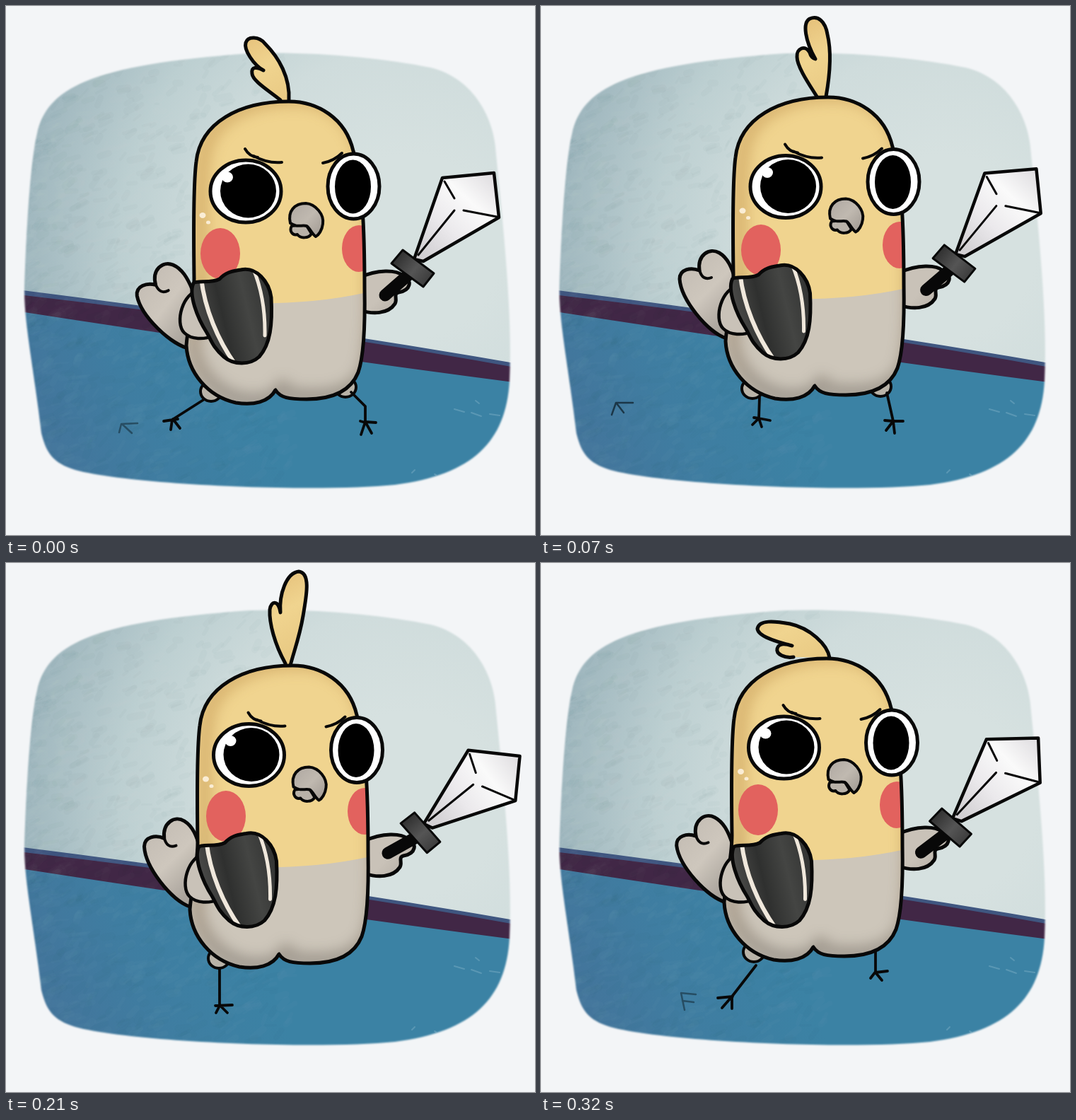
Write an HTML page with a canvas that moves like this. It is 748 px wide and 748 px high and loops after 0.35 s.

```html
<!DOCTYPE html>
<html lang="en">
<head>
<meta charset="utf-8">
<title>Bird knight</title>
<style>
html, body { margin: 0; width: 100%; height: 100%; overflow: hidden; background: #f3f5f7 }
canvas { display: block }
</style>
</head>
<body>
<canvas id="stage" width="748" height="748"></canvas>
<script>
const SIZE = 748, STEP = 70, INK = '#080808', GREY = '#c9c2b8', YELLOW = '#f0d48f';
const stage = document.getElementById('stage').getContext('2d');
let ctx = stage;

// Offsets are [dx, dy, degrees]; crest, legs and print are redrawn in each pose.
const poses = [
  { body: [0, 0], face: [0, 0], cheek: [0, 0], shield: [0, 0], wing: [-1, 15, -7], hand: [0, 0], sword: [0, 0, 0],
    crest: 'M388 133C372 120 349 106 348 96C346 85 355 86 364 91C350 83 336 62 339 52C342 42 358 43 366 53C386 73 402 101 400 134',
    thighs: [[290, 545], [480, 539]],
    legs: 'M279 557L235 585M223 587L243 584M235 585L233 599M236 584L246 597M488 546L508 566V588L523 589M508 588L502 606M508 588L517 604M501 587L508 589',
    print: 'M186 590L163 591L160 603M165 592L178 604', fade: .55 },
  { body: [6, -6], face: [7, -6.5], cheek: [8, -5], shield: [5.5, -6], wing: [0, 0, 0], hand: [7, -7], sword: [9, -7, .6],
    crest: 'M390 128C380 112 362 86 362 72C361 60 374 54 380 66Q382 73 388 75C374 50 369 24 380 18C392 13 402 22 405 40C411 65 408 100 403 128',
    thighs: [[299, 541], [480, 538]],
    legs: 'M309 553L308 583L299 592M308 583L312 595M301 582L308 583L324 586M489 547L498 587L488 600M486 586L498 587L512 587M498 587L500 604',
    print: 'M130 561L106 561L100 578M107 562L117 575', fade: .8 },
  { body: [14, -8], face: [15, -8], cheek: [15, -9], shield: [14.5, -13.5], wing: [12, -7, 1], hand: [15, -8], sword: [14, -6, 3.6],
    crest: 'M394 125C386 105 371 74 373 60C375 48 387 50 390 68C387 45 390 12 406 12C424 12 420 50 416 70C413 95 408 110 402 125',
    thighs: [[477, 546]],
    legs: 'M477 557L457 582M441 583L470 581M457 582L452 587L457 595M328 547Q342 545 342 527M338 534L366 536V570M382 567L367 572L359 583M358 569L367 572L375 583',
    print: 'M68 533L50 538V555M50 538L62 551', fade: .75 },
  { body: [5, 10], face: [4.5, 9.5], cheek: [8, 8], shield: [7.5, 9.5], wing: [-2, 16, 1], hand: [7, 9], sword: [11, 10, 12],
    crest: 'M395 142C380 115 372 85 373 66C375 52 386 53 388 70C386 45 396 14 414 12C432 14 424 50 420 75C415 105 407 125 402 145',
    thighs: [[301, 559]],
    legs: 'M302 573V626M296 626L320 625M302 626L297 636M303 626L313 636' },
  { body: [4, 0], face: [4.5, -1], cheek: [4, -1], shield: [7.5, 9.5], wing: [0, 10, -3], hand: [6, -1], sword: [4, 3, 4],
    crest: 'M357 133C345 135 332 129 334 121C336 113 346 114 355 117C335 112 307 104 306 93C308 80 330 82 352 86C380 92 405 115 408 134',
    thighs: [[301, 550]],
    legs: 'M304 569L270 613M250 615L271 613M270 613L256 629M270 613V630M473 548V578L466 587M473 579L490 577M473 579L482 590',
    print: 'M219 610L198 608L203 632M200 619L216 621', fade: .55 }
];

const frame = new Path2D('M44 180C58 118 115 83 345 67C440 64 535 74 600 87C662 102 691 160 693 210C702 300 717 440 712 530C707 616 660 663 550 677C440 688 180 678 98 656C66 646 57 632 50 604C41 525 26 450 26 405C28 330 34 220 44 180Z');
const torso = new Path2D('M400 135C440 135 480 158 491 205C504 250 507 310 507 400C508 455 506 495 498 518C486 548 455 556 425 556C400 556 388 554 381 543C372 560 350 565 325 561C285 552 257 518 255 480C257 450 266 420 266 385C265 310 265 250 269 220C275 165 330 135 400 135Z');

function fill(path, color) {
  ctx.fillStyle = color;
  ctx.fill(new Path2D(path));
}

function line(path, color = INK, width = 4) {
  ctx.strokeStyle = color;
  ctx.lineWidth = width;
  ctx.stroke(new Path2D(path));
}

function shape(path, color, width = 5) {
  fill(path, color);
  line(path, INK, width);
}

function oval(x, y, rx, ry, color, width = 0) {
  ctx.beginPath();
  ctx.ellipse(x, y, rx, ry, 0, 0, 7);
  ctx.fillStyle = color;
  ctx.fill();
  if (!width) return;
  ctx.strokeStyle = INK;
  ctx.lineWidth = width;
  ctx.stroke();
}

function ramp(x0, y0, x1, y1, ...colors) {
  const g = ctx.createLinearGradient(x0, y0, x1, y1);
  colors.forEach((c, i) => g.addColorStop(i / (colors.length - 1), c));
  return g;
}

function at([dx, dy, turn = 0], px, py, draw) {
  ctx.save();
  ctx.translate(dx + px, dy + py);
  ctx.rotate(turn * Math.PI / 180);
  ctx.translate(-px, -py);
  draw();
  ctx.restore();
}

function paintRoom() {
  const canvas = document.createElement('canvas');
  canvas.width = canvas.height = SIZE;
  ctx = canvas.getContext('2d');
  const wall = ctx.createRadialGradient(570, 340, 130, 570, 340, 560);
  wall.addColorStop(0, '#d6e1e0');
  wall.addColorStop(.35, '#cfdcdc');
  wall.addColorStop(.65, '#bccfd1');
  wall.addColorStop(1, '#9cb4bc');
  ctx.fillStyle = wall;
  ctx.fillRect(0, 0, SIZE, SIZE);
  fill('M0 399Q400 449 748 510V748H0Z', '#3f5680');
  fill('M0 406Q400 452 748 516V748H0Z', '#412746');
  fill('M0 429Q400 491 748 536V748H0Z', ramp(40, 640, 330, 510, '#44739a', '#3f7da1', '#3b82a4'));

  // Faint brush grain, strongest on the left
  let seed = 7;
  const random = () => (seed = seed * 16807 % 2147483647) / 2147483647;
  ctx.lineCap = 'round';
  for (let i = 0; i < 1600; i++) {
    const x = 20 + 380 * random() ** 1.5, y = 60 + 620 * random();
    const tone = random() < .5 ? '255,255,255' : '30,60,80';
    line(`M${x} ${y}l${4 + 14 * random()} ${-12 * random()}`, `rgba(${tone},.016)`, 3 + 8 * random());
  }
  line('M634 570l14 4M658 575l14 5M684 577l14 2M664 558l5 4M574 660l4 -4M606 662l2 1', 'rgba(170,205,220,.28)', 2);

  ctx.globalCompositeOperation = 'destination-in';
  ctx.filter = 'blur(1.3px)';
  ctx.fill(frame);
  ctx = stage;
  return canvas;
}

function drawWing() {
  const wing = 'M262 470C235 461 198 415 196 386C196 372 212 369 224 374C221 352 238 341 252 349C264 356 270 370 275 388';
  shape(wing, ramp(200, 370, 270, 440, '#c4bdb4', '#cec7bd', '#aaa49c'));
  line('M224 373Q228 389 241 384');
}

function drawHand() {
  shape('M500 384C525 372 552 373 561 381C576 388 572 402 555 405C547 407 554 415 550 421C540 436 518 436 500 430', ramp(510, 375, 565, 430, GREY, GREY, '#b5aea5'));
}

function drawSword() {
  line('M568 381L536 409', INK, 17);
  shape('M577 358L617 243L690 236L697 299L590 361Z', ramp(590, 350, 690, 240, '#d2d0d3', '#ebe9ec', '#fafafa', '#dfdde0'), 4.5);
  line('M620 248L634 272M583 352L634 289M647 289L694 298', INK, 3);
  shape('M561 345L605 378L590 397L545 364Z', ramp(555, 355, 600, 390, '#333', '#555', '#3a3a3a'), 3);
}

function drawBody(pose) {
  ctx.save();
  ctx.clip(torso);
  ctx.fillStyle = YELLOW;
  ctx.fillRect(240, 120, 280, 460);
  fill('M240 414Q400 431 515 404V580H240Z', '#cdc6ba');
  ctx.save();
  ctx.filter = 'blur(9px)';
  ctx.translate(10, -4);
  ctx.lineWidth = 22;
  ctx.strokeStyle = ramp(0, 140, 0, 560, 'rgba(160,105,40,.28)', 'rgba(160,105,40,.28)', 'rgba(90,85,80,.38)');
  ctx.stroke(torso);
  ctx.restore();
  const [bx, by] = pose.body, [cx, cy] = pose.cheek;
  ctx.translate(cx - bx, cy - by);
  oval(303, 350, 28, 36, '#e2625e');
  oval(499, 343, 24, 33, '#e2625e');
  ctx.restore();
  ctx.strokeStyle = INK;
  ctx.lineWidth = 5;
  ctx.stroke(torso);
}

function drawFace() {
  oval(278, 296, 4.5, 4, '#faedd5');
  oval(286, 306, 3, 2.5, '#faedd5');
  line('M338 202Q344 213 356 214M350 212Q370 223 390 221M475 208Q464 219 448 222', INK, 4);
  oval(339, 262, 50, 44, '#fff', 5);
  oval(342.5, 261.5, 39.5, 38, '#000');
  oval(313, 242, 8, 7.5, '#fff');
  oval(491.5, 255, 36.5, 46, '#fff', 5);
  oval(490.5, 255.5, 25.5, 38, '#000');
  shape('M404 311C400 318 405 325 412 323C416 329 428 329 432 322L424 309Z', '#b9b2a9', 4);
  shape('M402 307C398 290 408 279 424 279C438 280 450 295 448 308C447 317 442 324 438 326C432 322 430 314 425 311C418 309 412 314 402 307Z', ramp(405, 280, 448, 322, '#b0a9a2', '#c0b9b0', '#a19a93'), 4);
}

function drawShield() {
  shape('M274 402C250 404 238 448 252 462C262 472 280 472 294 466Z', GREY, 4.5);
  const plate = 'M265 392C270 387 290 393 302 386C312 375 322 375 332 373C354 368 372 390 375 412C377 450 374 478 358 496C345 508 322 508 308 496C292 482 290 472 284 462C270 440 258 408 265 392Z';
  fill(plate, ramp(270, 440, 375, 415, '#4a4a48', '#2f302f', '#444543', '#333433'));
  ctx.save();
  ctx.clip(new Path2D(plate));
  line('M276 385C281 428 299 472 325 508', '#f0e8dc', 6);
  line('M349 370Q367 412 366 466', '#f0e8dc', 5);
  ctx.restore();
  line(plate, INK, 5);
}

const room = paintRoom();

function draw(pose) {
  ctx.fillStyle = '#f3f5f7';
  ctx.fillRect(0, 0, SIZE, SIZE);
  ctx.drawImage(room, 0, 0);
  ctx.lineCap = ctx.lineJoin = 'round';
  if (pose.print) line(pose.print, `rgba(18,38,50,${pose.fade})`, 2.5);
  at(pose.wing, 262, 470, drawWing);
  at(pose.hand, 0, 0, drawHand);
  at(pose.sword, 574, 371, drawSword);
  for (const [x, y] of pose.thighs) oval(x, y, 15, 14, '#b9b3a8', 4);
  shape(pose.crest, ramp(350, 30, 405, 125, '#e5c079', YELLOW, '#e9ca84'));
  at(pose.body, 0, 0, () => drawBody(pose));
  line(pose.legs, INK, 3.8);
  at(pose.face, 0, 0, drawFace);
  at(pose.shield, 0, 0, drawShield);
}

let shown;
function tick() {
  const index = Math.floor(performance.now() / STEP) % poses.length;
  if (index !== shown) draw(poses[shown = index]);
  requestAnimationFrame(tick);
}
tick();
</script>
</body>
</html>
```
